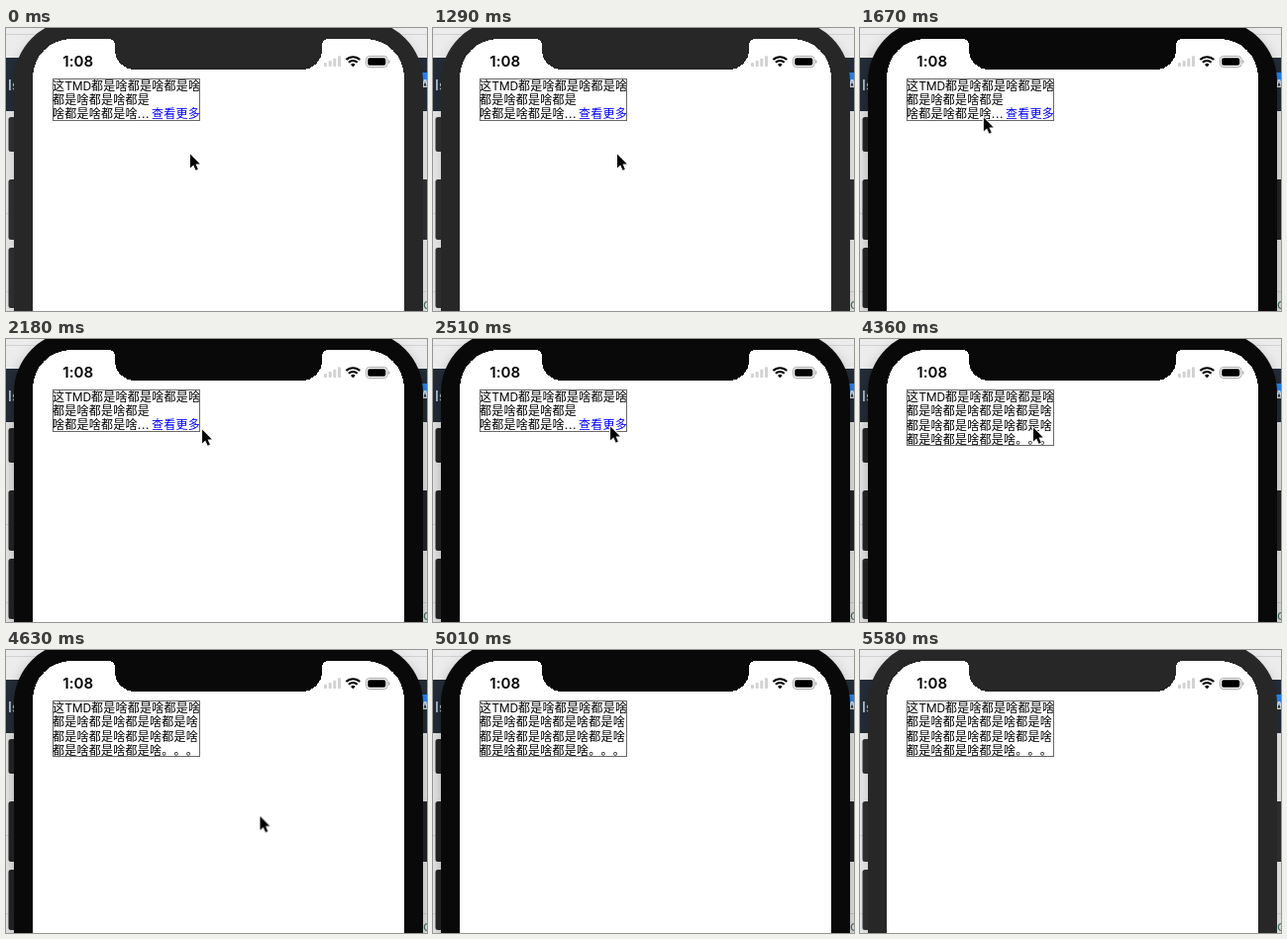
An HTML page for the animation above (5.68 s loop, 425x286 px).

```html
<!DOCTYPE html>
<html lang="zh">
<head>
<meta charset="utf-8">
<title>Expandable label</title>
<style>
  html, body { margin: 0; width: 100%; height: 100%; overflow: hidden; background: #e2e2e2; }
  svg { display: block; width: 425px; height: 286px; }

  .label {
    font: 12px Inter, "Noto Sans CJK SC", "Noto Sans CJK", sans-serif;
    letter-spacing: .25px;
    white-space: pre;
    text-spacing-trim: space-all;
    font-kerning: none;
  }
  .box { fill: none; stroke: #686868; }
  .link { fill: #00f; }
  .clock { font: 600 15px Inter, sans-serif; letter-spacing: .1px; }
  .page { font: 600 14px Inter, sans-serif; }

  .phone, .button, .shadow, .short, .long { animation: 5680ms step-end infinite; }
  .phone { animation-name: phone; }
  .button { animation-name: button; }
  .shadow { animation-name: shadow; }
  .short { animation-name: short; }
  .long { animation-name: long; }
  .cursor { animation: cursor 5680ms linear infinite; }

  /* The window is focused from 1590 to 5580 ms. */
  @keyframes phone { 0%, 98.239% { fill: #272727 } 27.993% { fill: #090909 } }
  @keyframes button { 0%, 98.239% { fill: #2b2d2f } 27.993% { fill: #1f2122 } }
  @keyframes shadow { 0%, 98.239% { opacity: .16 } 27.993% { opacity: .26 } }

  /* The label expands at 3100 ms. */
  @keyframes short { 0% { visibility: visible } 54.577% { visibility: hidden } }
  @keyframes long { 0% { visibility: hidden } 54.577% { visibility: visible } }

  @keyframes cursor {
    0%, 22.711% { transform: translate(185px, 126px) }
    23.768% { transform: translate(184px, 125px) }
    28% { transform: translate(140px, 99px) }
    32.218%, 33% { transform: translate(92px, 69px) }
    35.5% { transform: translate(147px, 76px) }
    38.38% { transform: translate(197px, 90px) }
    39.6% { transform: translate(200px, 90px) }
    42.254% { transform: translate(185px, 89px) }
    45.07%, 76.743% { transform: translate(175px, 86px) }
    76.761% { transform: translate(174px, 88px) }
    78.3% { transform: translate(171px, 90px) }
    80.3% { transform: translate(212px, 128px) }
    83.5% { transform: translate(325px, 228px) }
    86.268% { transform: translate(384px, 279px) }
    88.204%, 100% { transform: translate(386px, 285px) }
  }
</style>
</head>
<body>
<svg viewBox="0 0 425 286">
  <defs>
    <filter id="blur" x="-20%" y="-20%" width="140%" height="140%"><feGaussianBlur stdDeviation="7"/></filter>
  </defs>

  <!-- Page behind the phone -->
  <rect width="425" height="286" fill="#ececec"/>
  <path d="M0 6.5H425M0 187.5H425M0 266.5H425" stroke="#d2d2d2"/>
  <rect y="30" width="425" height="54" fill="#242d38"/>
  <text class="page" x="2" y="63" fill="#b4c4d4">Is</text>
  <rect x="414" y="45" width="11" height="11" fill="#2b86f5"/>
  <text class="page" x="418" y="63" fill="#dde3e8">A</text>
  <text class="page" x="421" y="284" fill="#3f7567" style="font-weight:400">c</text>

  <!-- Phone -->
  <rect class="shadow" x="6" y="0" width="417" height="400" rx="62" filter="url(#blur)"/>
  <g class="button">
    <rect x="2.5" y="90" width="8" height="35" rx="2.5"/>
    <rect x="2.5" y="153" width="8" height="61" rx="2.5"/>
    <rect x="2.5" y="222" width="8" height="61" rx="2.5"/>
    <rect x="418" y="153" width="9" height="61" rx="2.5"/>
  </g>
  <rect class="phone" x="8" y="-8" width="413" height="400" rx="62"/>
  <path fill="#fff" shape-rendering="crispEdges" d="M27 290V50A39 39 0 0 1 66 11H104a6 6 0 0 1 6 6V22a20 20 0 0 0 20 20H299a20 20 0 0 0 20-20V17a6 6 0 0 1 6-6H363A39 39 0 0 1 402 50V290z"/>

  <!-- Status bar -->
  <text class="clock" x="57.3" y="39">1:08</text>
  <g fill="#d2d2d2">
    <rect x="321" y="35" width="3" height="4" rx=".7"/>
    <rect x="325.7" y="33" width="3" height="6" rx=".7"/>
    <rect x="330.3" y="30.7" width="3" height="8.3" rx=".7"/>
    <rect x="335" y="28.3" width="3" height="10.7" rx=".7"/>
  </g>
  <g fill="none" stroke="#000" stroke-width="2.1">
    <path d="M343.4 32.1a9.8 9.8 0 0 1 13.8 0M345.9 34.8a6.2 6.2 0 0 1 8.8 0"/>
    <path fill="#000" stroke="none" d="M350.3 39.3l-2.3-2.4a3.3 3.3 0 0 1 4.6 0z"/>
  </g>
  <rect x="363.5" y="28.5" width="21.5" height="11" rx="3.2" fill="none" stroke="#a6a6a6"/>
  <rect x="365.2" y="30.2" width="18.1" height="7.6" rx="1.8"/>
  <path d="M386.2 32v4q1.4-.6 1.4-2t-1.4-2z" fill="#a6a6a6"/>

  <!-- Label -->
  <g class="label">
    <text x="47" y="63">这<tspan letter-spacing="-.2">TMD</tspan>都是啥都是啥都是啥</text>
    <g class="short">
      <rect class="box" x="47.5" y="51.5" width="148" height="42"/>
      <text x="47" y="77">都是啥都是啥都是</text>
      <text x="47" y="91">啥都是啥都是啥<tspan letter-spacing=".7">...</tspan></text>
      <text class="link" x="147" y="91">查看更多</text>
    </g>
    <g class="long">
      <rect class="box" x="47.5" y="51.5" width="148" height="56"/>
      <text x="47" y="77">都是啥都是啥都是啥都是啥</text>
      <text x="47" y="92">都是啥都是啥都是啥都是啥</text>
      <text x="47" y="106">都是啥都是啥都是啥。。。</text>
    </g>
  </g>

  <path class="cursor" d="M1 1.6V15.4L4.2 12.4 6.6 17.8 8.8 16.8 6.5 11.5H10.8z" stroke="#fff" stroke-width="2" stroke-linejoin="round" paint-order="stroke"/>
</svg>
</body>
</html>
```
